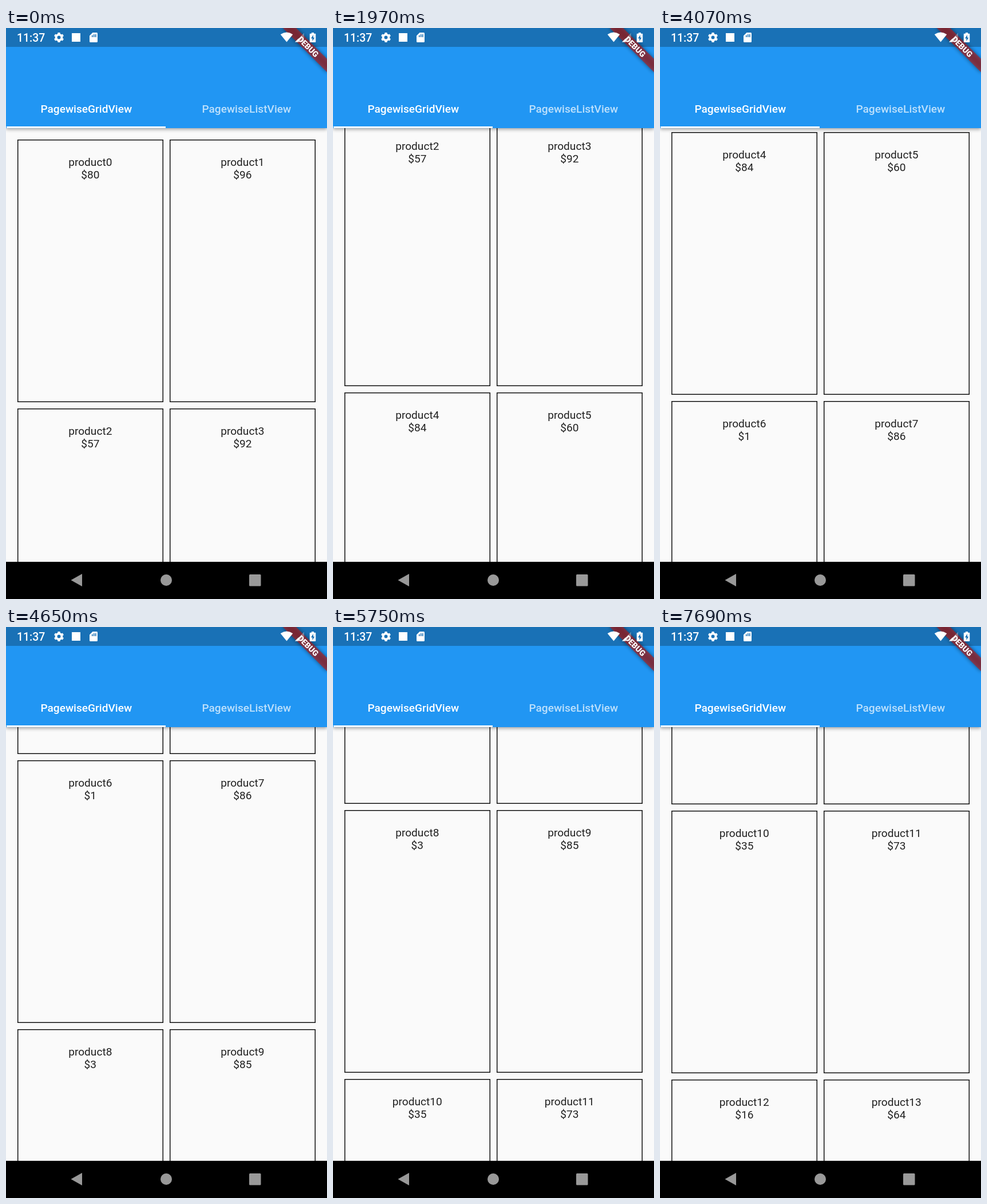
Write an HTML page that moves like this. It is 561 by 998 pixels and loops after 8000 ms.

```html
<!DOCTYPE html>
<html lang="en">
<head>
<meta charset="utf-8">
<title>Paged grid</title>
<style>
  html, body { margin: 0; width: 100%; height: 100%; overflow: hidden; background: #fafafa; }
  svg { display: block; width: 561px; height: 998px; }
  text { font-family: Roboto, sans-serif; font-size: 19.1px; }
  .mid { text-anchor: middle; }
  .label { font-weight: 500; fill: #fff; }
  .card rect { fill: none; stroke: #000; stroke-width: 1.4; }
  .card text { fill: #000; fill-opacity: .87; }
  .bar { filter: drop-shadow(0 2.5px 3px rgba(0, 0, 0, .38)); }
</style>
</head>
<body>
<svg viewBox="0 0 561 998" xmlns="http://www.w3.org/2000/svg">
  <defs>
    <clipPath id="view"><rect y="174" width="561" height="759"/></clipPath>
    <filter id="soft" x="-20%" y="-80%" width="140%" height="260%"><feGaussianBlur stdDeviation="3.5"/></filter>
  </defs>
  <rect width="561" height="998" fill="#fafafa"/>

  <g clip-path="url(#view)">
    <g id="list"></g>
  </g>

  <rect class="bar" width="561" height="175" fill="#2196f3"/>
  <rect width="561" height="33" fill="#000" fill-opacity=".25"/>
  <text class="label mid" x="140.3" y="148">PagewiseGridView</text>
  <text class="label mid" x="420.3" y="148" fill-opacity=".7">PagewiseListView</text>
  <rect x="1" y="172" width="278" height="2.8" fill="#fff"/>

  <g transform="translate(561 0) rotate(45)">
    <rect x="-54.6" y="38.2" width="109.2" height="16.4" fill="#000" fill-opacity=".5" filter="url(#soft)"/>
    <rect x="-80" y="38.2" width="160" height="16.4" fill="#b71c1c" fill-opacity=".63"/>
    <text class="mid" y="51.3" fill="#fff" style="font-size:13.9px;font-weight:900">DEBUG</text>
  </g>

  <g fill="#fff">
    <text class="label" x="19" y="23.6" style="font-size:19.4px">11:37</text>
    <g id="gear" transform="translate(92.5 16.5)">
      <circle r="4.9" fill="none" stroke="#fff" stroke-width="3.9"/>
    </g>
    <rect x="115" y="9" width="15" height="15"/>
    <path fill-rule="evenodd" d="M151.500 8H158.500Q160 8 160 9.500V23.500Q160 25 158.500 25H147.500Q146 25 146 23.500V13.500ZM150 12.500V16H151.600V12.500ZM153 11V16H154.600V11ZM156 11V16H157.600V11Z"/>
    <path d="M490.500 24.500L479.700 11.200Q490.500 3.800 501.300 11.200Z"/>
    <path d="M505 24.500L521 8.500V24.500Z" fill-opacity=".3"/>
    <path d="M505 24.500L511.500 18V24.500Z"/>
    <path fill-rule="evenodd" d="M534 8H538V9.700H540.200Q541.300 9.700 541.300 10.800V24Q541.300 25 540.200 25H532Q530.800 25 530.800 24V10.800Q530.800 9.700 532 9.700H534ZM537 12L533 18.200H535.500V23L539.300 16.700H537Z"/>
  </g>

  <rect y="933" width="561" height="65" fill="#000"/>
  <g fill="#999">
    <path d="M113.500 965L133 954V976Z"/>
    <circle cx="280" cy="965" r="10"/>
    <rect x="425" y="955" width="20.500" height="20.500" rx="1.500"/>
  </g>
</svg>
<script>
const LOOP = 8000, STEP = 41.1, ROW = 470, TOP = 195;
const PAGE = 6, SPIN = 1333;
const PRICES = [80, 96, 57, 92, 84, 60, 1, 86, 3, 85, 35, 73, 16, 64];

// Each flick: drag start, release time, fling length, and the offset at start, release and rest.
const FLICKS = [
  [1000, 1220, 750, 0, 239, 498],
  [2180, 2390, 450, 498, 748, 890],
  [4030, 4250, 660, 890, 1159, 1389],
  [5180, 5330, 430, 1389, 1522, 1755],
  [6330, 6500, 530, 1755, 1999, 2224]
];
// When the next page is requested and when it arrives.
const LOADS = [[1324, 3365], [5640, 7685]];

const list = document.getElementById('list');

function make(tag, attrs, parent, text) {
  const el = document.createElementNS('http://www.w3.org/2000/svg', tag);
  for (const k in attrs) el.setAttribute(k, attrs[k]);
  if (text) el.textContent = text;
  return parent.appendChild(el);
}

const gear = document.getElementById('gear');
for (let i = 0; i < 6; i++) {
  make('rect', { x: -2.1, y: -8.6, width: 4.2, height: 4, rx: .6, transform: `rotate(${i * 60})` }, gear);
}

const cards = PRICES.map((price, i) => {
  const x = i % 2 * 266 + 20, y = TOP + (i >> 1) * ROW;
  const g = make('g', { class: 'card', transform: `translate(${x} ${y})` }, list);
  make('rect', { x: .7, y: .7, width: 253.6, height: 457.6 }, g);
  make('text', { class: 'mid', x: 127.3, y: 46.3 }, g, 'product' + i);
  make('text', { class: 'mid', x: 127.3, y: 68.3 }, g, '$' + price);
  return g;
});
const arc = make('path', { fill: 'none', stroke: '#2196f3', 'stroke-width': 5.5, 'stroke-linecap': 'square' }, list);

const clamp = v => Math.min(1, Math.max(0, v));
const fling = u => (((1.2 * u - 3.27) * u + 3.065) * u) / .995;

// cubic-bezier(.4, 0, .2, 1)
function ease(x) {
  x = clamp(x);
  let lo = 0, hi = 1, s = 0;
  for (let i = 0; i < 24; i++) {
    s = (lo + hi) / 2;
    const bx = 1.2 * s * (1 - s) ** 2 + .6 * s * s * (1 - s) + s ** 3;
    if (bx < x) lo = s; else hi = s;
  }
  return s * s * (3 - 2 * s);
}

function offsetAt(t) {
  let pos = 0;
  for (const [start, free, len, a, b, c] of FLICKS) {
    if (t < start) break;
    pos = t < free
      ? a + (b - a) * ((t - start) / (free - start)) ** .84
      : b + (c - b) * fling(clamp((t - free) / len));
  }
  return Math.round(pos);
}

function arcPath(time, cy) {
  const turn = time / SPIN, k = Math.floor(turn), f = turn - k;
  const head = ease(f * 2), tail = ease(f * 2 - 1);
  const from = -90 + 270 * tail + 306 * f - 144 * k;
  const sweep = Math.max(.3, 270 * (head - tail));
  const at = deg => {
    const r = deg * Math.PI / 180;
    return `${(280.5 + 24.5 * Math.cos(r)).toFixed(3)} ${(cy + 24.5 * Math.sin(r)).toFixed(3)}`;
  };
  return `M${at(from)}A24.5 24.5 0 ${sweep > 180 ? 1 : 0} 1 ${at(from + sweep)}`;
}

function draw(t) {
  const pages = 1 + LOADS.filter(([, done]) => t >= done).length;
  const load = LOADS[pages - 1];
  list.setAttribute('transform', `translate(0 ${-offsetAt(t)})`);
  cards.forEach((card, i) => card.style.display = i < pages * PAGE ? '' : 'none');
  const busy = load && t >= load[0];
  arc.style.display = busy ? '' : 'none';
  if (busy) arc.setAttribute('d', arcPath(t - load[0], TOP + pages * 3 * ROW + 36.5));
}

const begin = performance.now();
function tick() {
  const t = (performance.now() - begin) % LOOP;
  draw(Math.floor((t + 8) / STEP) * STEP);
  requestAnimationFrame(tick);
}
tick();
</script>
</body>
</html>
```
